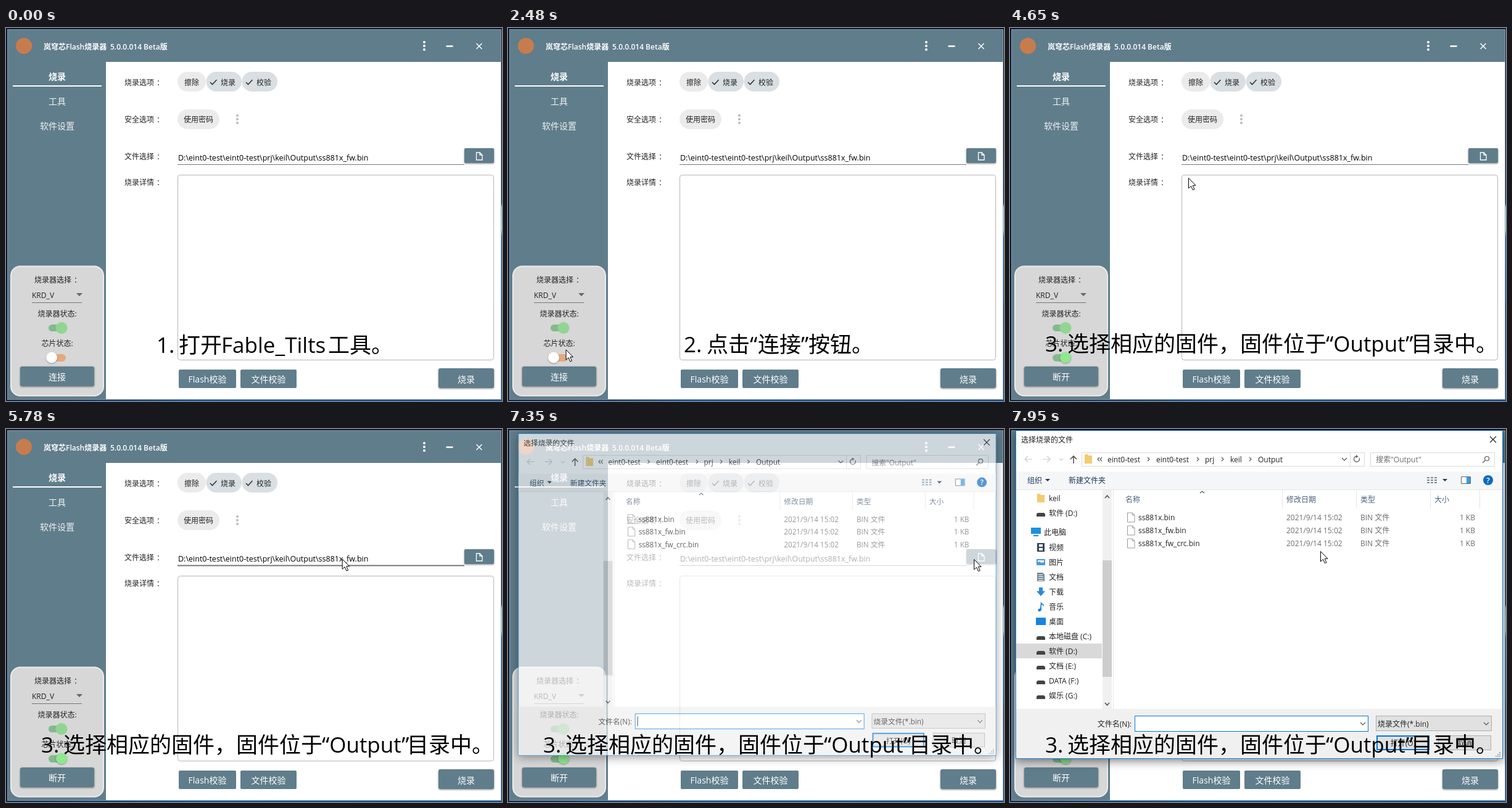
Write an HTML page that moves like this. It is 804 px wide and 605 px high and loops after 8000 ms.

```html
<!DOCTYPE html>
<html lang="zh-CN">
<head>
<meta charset="utf-8">
<title>Flash烧录器</title>
<style>
  html, body { margin: 0; width: 100%; height: 100%; overflow: hidden; background: #06183a; }
  svg { display: block; }
  text { font: 12px "Open Sans", "Noto Sans CJK SC", "Noto Sans CJK", sans-serif; fill: #222; dominant-baseline: central; }
  .mid { text-anchor: middle; }
  .end { text-anchor: end; }
  .w { fill: #fff; }
  .big { font-size: 14px; }
  .bold { font-weight: 600; }
  .cap text { font-size: 35px; fill: #000; }
  .line { fill: none; stroke: #555; stroke-width: 1.2; }
  .btn { fill: #607d8b; filter: drop-shadow(0 1px 1.5px #0007); }
  .flat { filter: none; }
  .grey { fill: #6d6d6d; }
  .head { fill: #4c607a; }
  .tool { fill: #1e395b; }
  #dialog { transform-origin: 404px 268px; filter: drop-shadow(0 3px 8px #0008); }
</style>
</head>
<body>
<svg width="804" height="605" viewBox="0 0 804 605">
  <defs>
    <linearGradient id="edge" x2="0" y2="1">
      <stop offset="0" stop-color="#06183a"/><stop offset=".47" stop-color="#0a2a5a"/>
      <stop offset=".48" stop-color="#9be4ff"/><stop offset=".54" stop-color="#bfefff"/>
      <stop offset=".56" stop-color="#1068b8"/><stop offset=".72" stop-color="#0a58a8"/>
      <stop offset=".75" stop-color="#063a78"/><stop offset="1" stop-color="#0a4a98"/>
    </linearGradient>
    <linearGradient id="floor">
      <stop offset="0" stop-color="#06264f"/><stop offset=".4" stop-color="#0b5aa8"/><stop offset="1" stop-color="#0a4f98"/>
    </linearGradient>
    <clipPath id="inButton"><rect x="23" y="549" width="120" height="32" rx="3"/></clipPath>
  </defs>

  <!-- desktop and window -->
  <rect width="804" height="605" fill="#06183a"/>
  <rect x="801" width="3" height="605" fill="url(#edge)"/>
  <rect y="602" width="804" height="3" fill="url(#floor)"/>
  <rect x="2.5" y="2.5" width="800" height="600" fill="#fff" stroke="#8f9aa0"/>
  <path d="M3 3H802V55H162V602H3z" fill="#607d8b"/>
  <circle cx="29" cy="29" r="13" fill="#c77c4e"/>
  <text class="w bold" x="61" y="30">岚穹芯Flash烧录器<tspan x="169">5.0.0.014 Beta版</tspan></text>
  <g class="w"><circle cx="678" cy="23" r="2"/><circle cx="678" cy="29" r="2"/><circle cx="678" cy="35" r="2"/></g>
  <path d="M713.5 29.5h11" stroke="#fff" stroke-width="2.5"/>
  <path d="M762.500 25l9 9m0-9l-9 9" stroke="#fff" stroke-width="1.5"/>
  <text class="w mid big bold" x="83" y="78">烧录</text>
  <path d="M11 94h144" stroke="#fff" stroke-width="2"/>
  <text class="w mid big" x="83" y="118" opacity=".9">工具</text>
  <text class="w mid big" x="83" y="158" opacity=".9">软件设置</text>

  <!-- programmer panel -->
  <rect x="8" y="386.500" width="150" height="210" rx="15" fill="#d7d7d7" stroke="#ececec" stroke-width="2"/>
  <text x="46" y="408">烧录器选择<tspan dx="4">：</tspan></text>
  <text x="42" y="433.5">KRD_V</text>
  <path d="M114 430h10l-5 5z" fill="#666"/>
  <path d="M42 445.5h81" stroke="#777"/>
  <text class="mid" x="83" y="463">烧录器状态:</text>
  <rect x="69" y="481" width="26" height="11" rx="5.5" fill="#82b98e"/>
  <circle cx="90" cy="486.5" r="9.5" fill="#92d592"/>
  <text class="mid" x="83" y="511">芯片状态:</text>
  <rect id="chipTrack" x="69" y="529" width="28" height="12" rx="6"/>
  <circle id="chipThumb" cy="534.5" r="9" style="filter:drop-shadow(0 1px 1px #0005)"/>
  <g id="connect">
    <rect class="btn" x="23" y="549" width="120" height="32" rx="3"/>
    <circle id="ripple" cx="84" cy="566" fill="#fff" clip-path="url(#inButton)"/>
    <text class="w mid big" x="83" y="565"></text>
  </g>

  <!-- options -->
  <text x="192" y="88">烧录选项<tspan dx="4">：</tspan></text>
  <text x="192" y="148">安全选项<tspan dx="4">：</tspan></text>
  <text x="192" y="208">文件选择<tspan dx="4">：</tspan></text>
  <text x="192" y="250">烧录详情<tspan dx="4">：</tspan></text>
  <rect x="278" y="71" width="46" height="32" rx="16" fill="#ebebeb"/>
  <rect x="324.5" y="71" width="57.5" height="32" rx="16" fill="#d9dfe2"/>
  <rect x="382.5" y="71" width="57.5" height="32" rx="16" fill="#d9dfe2"/>
  <rect x="278" y="132" width="68" height="32" rx="16" fill="#ebebeb"/>
  <path d="M331 88l3.500 3.500 7-7.500M389 88l3.500 3.500 7-7.500" class="line" style="stroke-width:1.6;stroke:#333"/>
  <text class="mid" x="301" y="88">擦除</text>
  <text class="mid" x="360" y="88">烧录</text>
  <text class="mid" x="418" y="88">校验</text>
  <text class="mid" x="312" y="148">使用密码</text>
  <g fill="#bbb"><circle cx="375" cy="142" r="2"/><circle cx="375" cy="148" r="2"/><circle cx="375" cy="154" r="2"/></g>
  <text x="279" y="210" style="font-size:12.5px;fill:#000">D:\eint0-test\eint0-test\prj\keil\Output\ss881x_fw.bin</text>
  <path id="fieldLine" d="M278 221.5h465" stroke="#777"/>
  <rect id="browse" class="btn" x="743" y="195" width="48" height="24" rx="2"/>
  <path d="M762.5 202h5.500l4 4v8h-9.500zM768 202v4h4" fill="none" stroke="#fff" stroke-width="1.3"/>
  <rect x="278.5" y="238.5" width="512" height="300" rx="4" fill="none" stroke="#b5b5b5"/>
  <rect class="btn flat" x="280" y="554" width="93" height="30" rx="2"/>
  <rect class="btn flat" x="380" y="554" width="91" height="30" rx="2"/>
  <rect class="btn" x="701" y="552" width="90" height="32" rx="3"/>
  <text class="w mid big" x="326.500" y="569">Flash校验</text>
  <text class="w mid big" x="425.500" y="569">文件校验</text>
  <text class="w mid big" x="746" y="569">烧录</text>
  <g id="tip">
    <rect x="720" y="235" width="90" height="30" rx="2" fill="#616161"/>
    <text class="w" x="727" y="250">打开Flash文件</text>
  </g>

  <!-- file dialog -->
  <g id="dialog">
    <rect x="9.5" y="2.5" width="789" height="532" fill="#fff" stroke="#1883d7"/>
    <rect x="10" y="69" width="788" height="30" fill="#f5f6f7"/>
    <rect x="10" y="454" width="788" height="80" fill="#f0f0f0"/>
    <text x="18" y="17.5">选择烧录的文件</text>
    <path class="line" style="stroke:#222" d="M778 12l10 10m0-10l-10 10"/>
    <path class="line" style="stroke:#ccc" d="M36 49H24m5-5l-5 5 5 5M53 49h12m-5-5l5 5-5 5M80 48l3 3 3-3"/>
    <path class="line" style="stroke-width:1.6" d="M103 56V44m-5 5l5-5 5 5"/>
    <path class="line" style="stroke:#d9d9d9;stroke-width:1" d="M116.5 38.5h458v22h-458zM551.5 38.5v22M584.5 38.5h201v22h-201z"/>
    <path d="M121 41h5l1 2h6v13h-12z" fill="#f3cb70"/>
    <path class="line" d="M145 46l-3 3 3 3m4-6l-3 3 3 3M223 46l3 3-3 3M303 46l3 3-3 3M343 46l3 3-3 3M388 46l3 3-3 3M538 47l4 4 4-4M566 47a4.500 4.500 0 1 1-3-2.500l-2-2m2 2l-2 2M770 51l-4 4"/>
    <circle class="line" cx="773" cy="48" r="3.5"/>
    <text x="158" y="49">eint0-test</text><text x="237" y="49">eint0-test</text><text x="316" y="49">prj</text>
    <text x="357" y="49">keil</text><text x="402" y="49">Output</text>
    <text class="grey" x="593" y="49.5">搜索"Output"</text>
    <text class="tool" x="28" y="83.5">组织</text><text class="tool" x="95" y="83.5">新建文件夹</text>
    <path d="M57 81h8l-4 4zM701 81h8l-4 4z" fill="#1e395b"/>
    <path d="M676 79h4m2 0h4m2 0h4M676 83h4m2 0h4m2 0h4M676 87h4m2 0h4m2 0h4" stroke="#789" stroke-width="2"/>
    <path d="M731.5 77.5h15v11h-15z" fill="#fff" stroke="#567"/><path d="M740 78h6v10h-6z" fill="#3b9be0"/>
    <circle cx="775" cy="83" r="8" fill="#0a6ac0"/><text class="w mid bold" x="775" y="83">?</text>
    <path d="M10 98.5h788M441.5 99v30M561.5 99v30M681.5 99v30M761.5 99v30M167.5 99v355" stroke="#e5e5e5"/>
    <path class="line" d="M308 104l3.500-3 3.500 3"/>
    <text class="head" x="187" y="114">名称</text><text class="head" x="448" y="114">修改日期</text>
    <text class="head" x="568" y="114">类型</text><text class="head" x="688" y="114">大小</text>
    <g id="files"></g>
    <g id="nav"><rect x="10" y="348" width="139" height="24" fill="#d9d9d9"/></g>
    <rect x="150" y="99" width="15" height="355" fill="#f0f0f0"/><rect x="150" y="213" width="15" height="189" fill="#cdcdcd"/>
    <path class="line" style="stroke-width:1.6" d="M154 112l3.500-4 3.500 4M154 444l3.500 4 3.500-4"/>
    <text class="end" x="197" y="478">文件名(N):</text>
    <rect x="202.5" y="465.5" width="378" height="25" fill="#fff" stroke="#0078d7"/>
    <path id="caret" d="M206.5 470v16" stroke="#000"/>
    <rect x="593.5" y="465.5" width="187" height="24" fill="#e1e1e1" stroke="#adadad"/>
    <path class="line" d="M568 476l4 4 4-4M768 476l4 4 4-4"/>
    <text x="596" y="478">烧录文件(*.bin)</text>
    <rect x="595" y="498" width="84" height="22" fill="#e1e1e1" stroke="#0078d7" stroke-width="2"/>
    <rect x="694.5" y="497.5" width="85" height="23" fill="#e1e1e1" stroke="#adadad"/>
    <text class="mid" x="637" y="509">打开(O)</text><text class="mid" x="737" y="509">取消</text>
    <path d="M787 531h8M790 528h5M793 525h2" stroke="#aaa" stroke-width="2" stroke-dasharray="2 1"/>
  </g>

  <g class="cap">
    <text y="513"><tspan x="244">1.</tspan><tspan x="280">打开</tspan><tspan x="349">Fable_Tilts</tspan><tspan x="522">工具。</tspan></text>
    <text y="511.5"><tspan x="285">2.</tspan><tspan x="322">点击</tspan><tspan x="392">“</tspan><tspan x="405">连接</tspan><tspan x="475">”</tspan><tspan x="487">按钮。</tspan></text>
    <text y="510.5"><tspan x="57">3.</tspan><tspan x="93">选择相应的固件，固件位于</tspan><tspan x="512">“Output”</tspan><tspan x="650">目录中。</tspan></text>
  </g>
  <g id="cursor" fill="#fff" stroke="#000" stroke-linejoin="round">
    <path d="M.5.5V17l4-3.700 2.800 6.400 2.700-1.200-2.800-6.200H12z"/>
    <path d="M-2 1a2 2 0 0 1 4 0v6q2-1.500 3.500.5 2-1 3 .7 2-.7 2 1.800v5q0 4-2 7.500h-9q-1-3-5.500-7.500-1.500-3 1-3l3 2.500z"/>
  </g>
</svg>
<script>
const $ = id => document.getElementById(id);
const set = (el, attrs) => { for (const k in attrs) el.setAttribute(k, attrs[k]); };
const show = (el, on) => { el.style.display = on ? '' : 'none'; };

$('files').innerHTML = ['ss881x.bin', 'ss881x_fw.bin', 'ss881x_fw_crc.bin'].map((name, i) => `
  <g transform="translate(0 ${143.5 + 21 * i})">
    <path d="M190.5-7.500h8l3.500 3.500v11.500h-11.500zM198.5-7.500v3.500h3.500" fill="#fff" stroke="#999"/>
    <text x="208">${name}</text><text class="grey" x="448">2021/9/14 15:02</text>
    <text class="grey" x="568">BIN 文件</text><text class="grey end" x="754">1 KB</text>
  </g>`).join('');

const icons = {
  folder: ['#f3cb70', 'M-6-7h5l1 2h6V7H-6z'],
  drive: ['#444', 'M-7 2l2-2h10l2 2v4H-7z'],
  pc: ['#1e90e0', 'M-8-7H8V3H-8zM-4 5h8v2h-8z'],
  film: ['#345', 'M-6-7H6V7H-6zM-3-5v4h6v-4zM-3 1v4h6V1z'],
  picture: ['#4a9ad8', 'M-7-5H7V5H-7zM-5-3v3l3-1 3 2 4-1v-3z'],
  page: ['#789', 'M-6-7H3l3 3V7H-6zM-4-4v1h7v-1zM-4-1v1h8v-1zM-4 2v1h8V2zM-4 5v1h8V5z'],
  down: ['#2a8ad8', 'M-3-7h6v6h4L0 7l-7-8h4z'],
  note: ['#1e80d0', 'M0-8q1 3 5 5-1 3-1 4 0-4-3-4v7q0 4-4 4-3-1-1-4l3-1z'],
  desk: ['#1785dc', 'M-8-6H8V6H-8z'],
};
const nav = [
  ['keil', 112, 'folder'], ['软件 (D:)', 136, 'drive'], ['此电脑', 167, 'pc'], ['视频', 192, 'film'],
  ['图片', 216, 'picture'], ['文档', 240, 'page'], ['下载', 264, 'down'], ['音乐', 288, 'note'],
  ['桌面', 312, 'desk'], ['本地磁盘 (C:)', 336, 'drive'], ['软件 (D:)', 360, 'drive'],
  ['文档 (E:)', 384, 'drive'], ['DATA (F:)', 408, 'drive'], ['娱乐 (G:)', 432, 'drive'],
];
$('nav').innerHTML += nav.map(([name, y, icon]) => {
  const x = icon === 'pc' ? 42 : 50, [color, d] = icons[icon];
  return `<path transform="translate(${x} ${y})" fill-rule="evenodd" fill="${color}" d="${d}"/><text x="${x + 13}" y="${y}">${name}</text>`;
}).join('');

// Pointer path: time, x, y
const path = [
  [500, 735, 612], [570, 714, 591], [780, 551, 495], [1050, 551, 495], [1190, 490, 425], [1330, 350, 364],
  [1470, 175, 435], [1600, 94, 535], [1810, 72, 518], [1880, 68, 508], [2080, 62, 493], [2300, 80, 515],
  [2500, 95, 522], [2680, 92, 538], [3020, 84, 566], [4180, 84, 566], [4390, 190, 400], [4650, 289, 243],
  [4850, 289, 243], [5050, 204, 208], [5250, 204, 208], [5500, 360, 196], [5850, 590, 214], [6050, 590, 214],
  [6500, 756, 212], [7420, 755, 211], [7950, 503, 198],
];
const ramp = (t, from, to) => Math.min(1, Math.max(0, (t - from) / (to - from)));
const mix = (a, b, k) => a + (b - a) * k;
function pointAt(t) {
  const i = path.findIndex(p => p[0] > t);
  if (i <= 0) return path[i < 0 ? path.length - 1 : 0].slice(1);
  const [t0, x0, y0] = path[i - 1], [t1, x1, y1] = path[i], k = ramp(t, t0, t1);
  return [mix(x0, x1, k), mix(y0, y1, k)];
}

const captions = document.querySelectorAll('.cap text');
const [arrow, hand] = $('cursor').children;
const label = $('connect').querySelector('text'), connectBox = $('connect').firstElementChild;

function draw() {
  const t = performance.now() % 8000;
  const within = (from, to) => t >= from && t < to;

  const step = t < 1190 ? 0 : t < 4250 ? 1 : 2;
  captions.forEach((c, i) => show(c, i === step));

  const onConnect = within(2800, 3230) || within(3780, 4230), onBrowse = within(6450, 7280);
  set($('cursor'), { transform: `translate(${pointAt(t)})`, opacity: t < 570 ? 0 : 1 });
  show(hand, onConnect || onBrowse);
  show(arrow, !(onConnect || onBrowse));

  const busy = within(3230, 3710);
  label.textContent = t < 3230 ? '连接' : busy ? '连接中' : '断开';
  connectBox.style.fill = onConnect ? '#587482' : '';
  set($('connect'), { opacity: busy ? mix(.6, .3, ramp(t, 3230, 3360)) : 1 });
  set($('ripple'), { r: 36 * ramp(t, 3130, 3370), opacity: .3 * (1 - ramp(t, 3640, 3850)) });

  const linked = ramp(t, 3640, 3900);
  set($('chipTrack'), { fill: t < 3230 ? '#e5a980' : linked > .3 ? '#85b98f' : '#e39a9a' });
  set($('chipThumb'), { cx: mix(74, 90, linked), fill: linked > .3 ? '#8ee890' : '#fff' });

  set($('fieldLine'), { 'stroke-width': within(5380, 6430) ? 2 : 1 });
  $('browse').style.fill = onBrowse ? '#587482' : '';
  set($('tip'), { opacity: .9 * ramp(t, 6620, 6860) * (1 - ramp(t, 7000, 7080)) });

  const open = t < 7280 ? 0 : t < 7350 ? .3 : mix(.69, 1, ramp(t, 7380, 7480));
  show($('dialog'), open);
  $('dialog').style.opacity = open;
  $('dialog').style.transform = `scale(${mix(.94, 1, open)})`;
  show($('nav'), t >= 7480);
  show($('caret'), t < 7800);
  requestAnimationFrame(draw);
}
draw();
</script>
</body>
</html>
```
